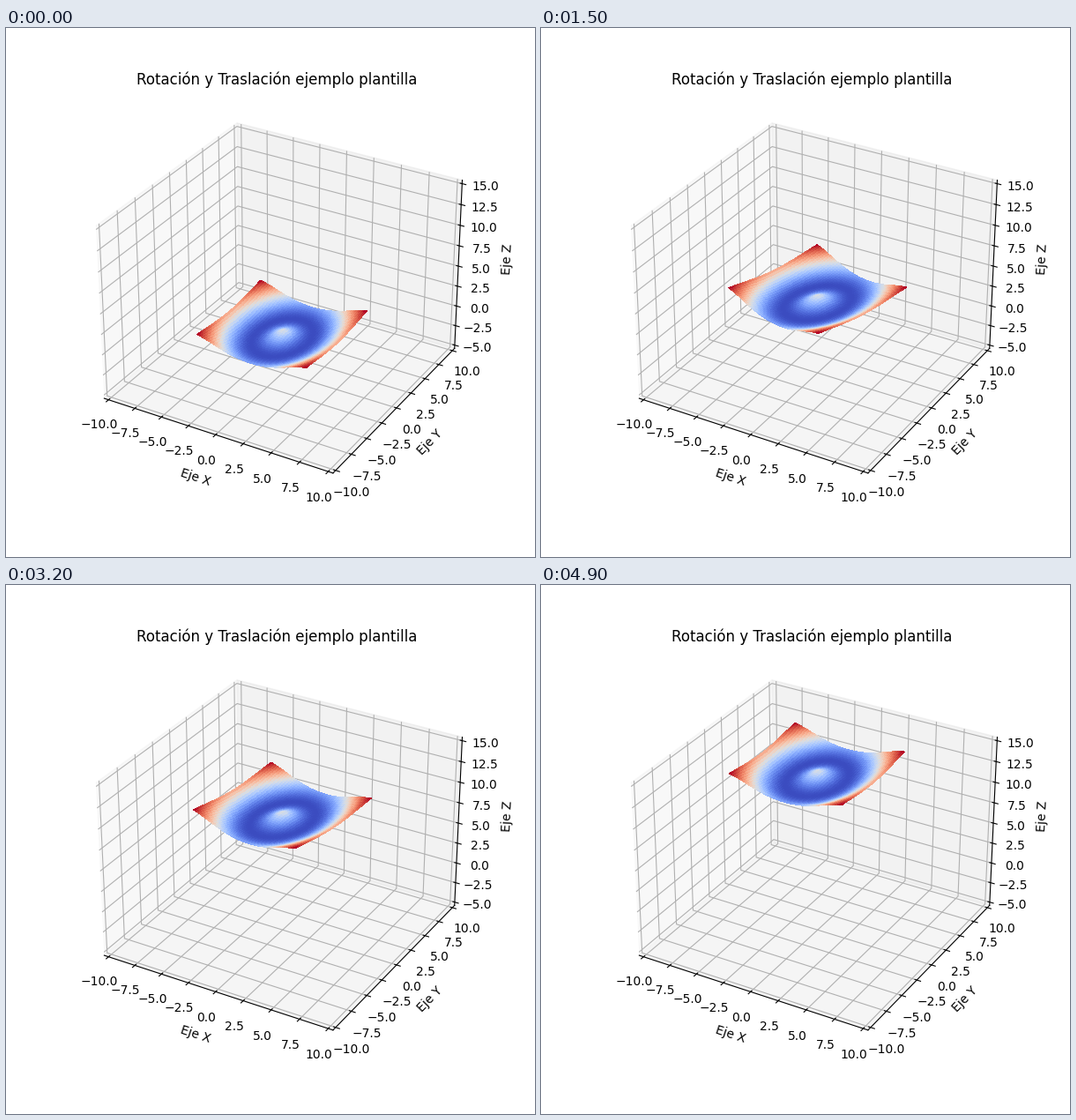
These frames come from a looping animation (600x600 px, 5 s). A matplotlib script:

```python
import numpy as np
import matplotlib.pyplot as plt
from matplotlib.animation import FuncAnimation

FRAMES = 50
TOTAL_ANGLE = 3 * np.pi
HALF = 5
DIAMETER = 2 * HALF * np.sqrt(2)
MARGIN = 1 / 48

fig = plt.figure(figsize=(6, 6), dpi=100)
ax = fig.add_subplot(projection="3d")
ax.set_xlim(-10, 10, view_margin=MARGIN)
ax.set_ylim(-10, 10, view_margin=MARGIN)
ax.set_zlim(-5, 15, view_margin=MARGIN)
ax.set_xlabel("Eje X")
ax.set_ylabel("Eje Y")
ax.set_zlabel("Eje Z")
ax.set_title("Rotación y Traslación ejemplo plantilla")

side = np.linspace(-HALF, HALF, 50)
X, Y = np.meshgrid(side, side)
Z = np.sin(-np.sqrt(X**2 / 2 + Y**2 / 4))

surface = None


def draw(frame):
    """Turn the surface about the z axis while lifting it by its diameter."""
    global surface
    if surface is not None:
        surface.remove()
    t = frame / (FRAMES - 1)
    c, s = np.cos(TOTAL_ANGLE * t), np.sin(TOTAL_ANGLE * t)
    surface = ax.plot_surface(
        c * X - s * Y, s * X + c * Y, Z + DIAMETER * t,
        cmap="coolwarm", linewidth=0, antialiased=False,
    )
    return (surface,)


def start():
    return draw(0)


anim = FuncAnimation(fig, draw, frames=FRAMES, init_func=start,
                     interval=100, repeat=True, repeat_delay=0)
plt.show()
```
